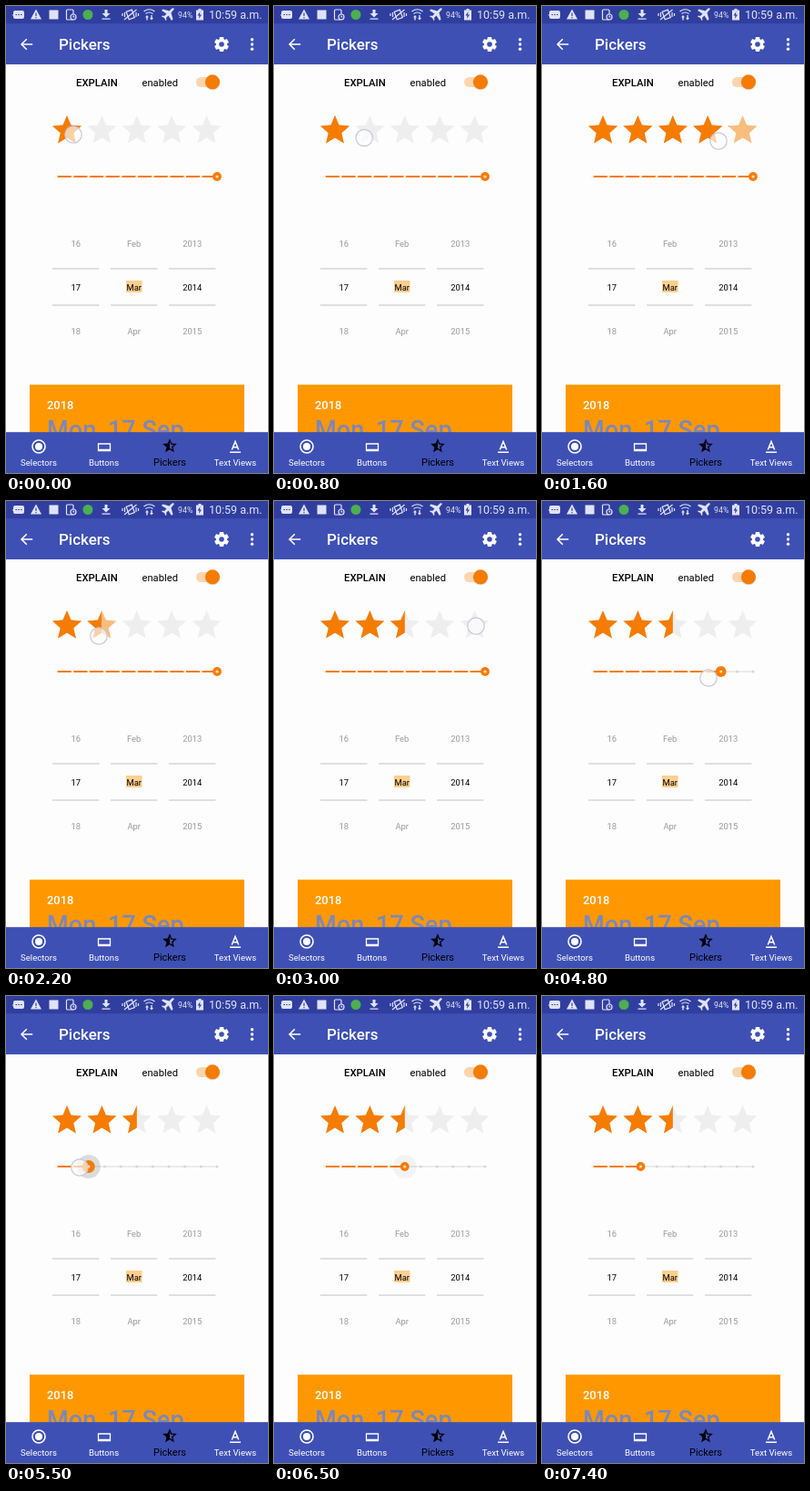
Recreate the animation shown at these times as an HTML page. Size 288 by 512 pixels, loop 8000 ms.

```html
<!DOCTYPE html>
<html lang="en">
<head>
<meta charset="utf-8">
<title>Pickers</title>
<style>
  html, body { margin: 0; height: 100%; overflow: hidden; background: #fdfdfd; }
  svg { display: block; width: 100vw; height: 100vh; }
  text { font-family: Roboto, sans-serif; }
  .mid { text-anchor: middle; }
  .line { fill: none; stroke: #fff; }
</style>
</head>
<body>
<svg viewBox="0 0 288 512">
  <defs>
    <path id="star" d="M12 17.27 18.18 21l-1.64-7.03L22 9.24l-7.19-.61L12 2 9.19 8.63 2 9.24l5.46 4.73L5.82 21z"/>
    <clipPath id="fillClip"><rect id="fillBox" x="47.8" y="110" width="0" height="50"/></clipPath>
  </defs>
  <rect width="288" height="512" fill="#fdfdfd"/>

  <!-- status bar and app bar -->
  <rect width="288" height="64" fill="#3e50b4"/>
  <rect width="288" height="19.2" fill="#303f9f"/>
  <g fill="#e0e3f5">
    <path d="M10 5h8a2 2 0 0 1 2 2v5a2 2 0 0 1-2 2h-8a2 2 0 0 1-2-2v-1l-1-1 1-1v-2a2 2 0 0 1 2-2z"/>
    <path d="M33 3.5l6 11h-12z"/>
    <rect x="47.5" y="4.5" width="10" height="10"/>
    <circle cx="90" cy="9.5" r="5.5" fill="#4caf50"/>
    <path d="M108.500 4h3v4h3l-4.500 4.500-4.500-4.500h3zM105.500 13.500h9v1.300h-9z"/>
    <path d="M185 3q-1.500-1.500-3 0l-2.500 2.500-7-2-1.500 1.500 5.500 3.500-2.500 2.500-2-.5-1 1 3 1.500 1.500 3 1-1-.5-2 2.500-2.500 3.500 5.500 1.500-1.500-2-7z"/>
    <path d="M211.500 3h3v1.500h2.500v11h-8v-11h2.500z"/>
    <path d="M213.500 6l-3 4.500h2l-.5 3.500 3-4.500h-2z" fill="#303f9f"/>
    <path d="M153 12.500l2-2.500 2 2.500h-1.300v3h-1.400v-3zM158 13l2 2.500 2-2.500h-1.300v-3h-1.400v3z"/>
    <text x="189" y="12.500" font-size="8.8">94%</text>
    <text x="223" y="14" font-size="12.5">10:59 a.m.</text>
  </g>
  <g class="line" stroke-width="1.2" style="stroke:#e0e3f5">
    <rect x="66.500" y="4" width="7.500" height="11" rx="1"/>
    <circle cx="74" cy="12" r="3" fill="#303f9f"/>
    <path d="M74 10.500v1.500h1.500"/>
    <rect x="133.500" y="5" width="6.500" height="9" transform="rotate(-20 136.700 9.500)"/>
    <path d="M130.500 7v5M128 8v3M143 7v5M145.500 8v3M130 15 143.500 4"/>
    <path d="M151.500 6q6-4.500 12 0M153.500 8.500q4-3 8 0"/>
    <path d="M33 7.500v3.500M33 12v1.300M10.500 9.500h1.500M13.300 9.500h1.500M16.100 9.500h1.500" style="stroke:#303f9f"/>
  </g>
  <path class="line" stroke-width="1.5" d="M29.200 42H17M22.800 36.200 17 42l5.800 5.800"/>
  <text x="58" y="48" font-size="16.9" font-weight="500" fill="#fff">Pickers</text>
  <g id="gear" transform="translate(237 42)" fill="#fff"><circle r="6.2"/></g>
  <g fill="#fff">
    <circle cx="270.500" cy="36.800" r="1.7"/><circle cx="270.500" cy="42" r="1.7"/><circle cx="270.500" cy="47.200" r="1.7"/>
  </g>

  <!-- switch row -->
  <text x="77" y="88" font-size="11.3" font-weight="500">EXPLAIN</text>
  <text x="149.500" y="88" font-size="11.2">enabled</text>
  <rect x="209" y="78" width="26" height="11" rx="5.5" fill="#fbd5ae"/>
  <circle cx="227" cy="84" r="8.4" fill="#000" opacity=".12"/>
  <circle cx="227" cy="83.300" r="8" fill="#f57c00"/>

  <!-- rating -->
  <g id="empty"></g>
  <g id="full" fill="#f57c00" clip-path="url(#fillClip)"></g>

  <!-- slider -->
  <path d="M55.500 187H232" stroke="#e6e6e6" stroke-width="1.5"/>
  <path id="bar" stroke="#f57c00" stroke-width="2"/>
  <g id="ticks"></g>
  <circle id="halo" cy="187" r="13" fill="#000"/>
  <circle id="knob" cy="187" fill="#f57c00"/>
  <circle id="dot" cy="187" r="1.6" fill="#fde3c8"/>

  <g id="wheels" class="mid" font-size="9.4"></g>

  <!-- date card -->
  <rect x="26" y="415.2" width="236" height="60" fill="#ff9800"/>
  <text x="45" y="441.500" font-size="12.9" font-weight="500" fill="#fff">2018</text>
  <text x="45" y="474" font-size="27.1" font-weight="500" fill="#7d87b8">Mon, 17 Sep</text>

  <!-- bottom bar -->
  <rect y="467.2" width="288" height="45" fill="#3e50b4"/>
  <circle class="line" cx="36" cy="483" r="7" stroke-width="1.6"/>
  <circle cx="36" cy="483" r="4" fill="#fff"/>
  <path class="line" stroke-width="1.3" d="M101.500 480h13v7.500h-13zM101.500 486.500h13"/>
  <path transform="translate(170.600 472.800) scale(.78)" d="M22 9.240l-7.190-.62L12 2 9.190 8.630 2 9.240l5.460 4.730L5.820 21 12 17.270 18.180 21l-1.630-7.030zM12 15.400V6.100l1.710 4.040 4.380.38-3.320 2.880 1 4.280z"/>
  <path class="line" stroke-width="1.5" d="M248.300 486.500 252 477.500l3.700 9M249.500 483.700h5M246 489.300h12"/>
  <g class="mid" fill="#fff" font-size="9.6">
    <text x="36" y="503.700">Selectors</text>
    <text x="107.500" y="503.700">Buttons</text>
    <text x="180" y="503.700" font-size="11" fill="#000">Pickers</text>
    <text x="252" y="503.700">Text Views</text>
  </g>

  <circle id="touch" r="9.2" fill="#fff" fill-opacity=".65" stroke="#c6c8e2" stroke-width="1.2"/>
</svg>
<script>
const $ = id => document.getElementById(id);
const set = (el, attrs) => {
  for (const k in attrs) el.setAttribute(k, attrs[k]);
  return el;
};
const add = (parent, tag, attrs, text = '') => {
  const el = set(document.createElementNS('http://www.w3.org/2000/svg', tag), attrs);
  el.textContent = text;
  return parent.appendChild(el);
};

const LOOP = 8000, STEP = 100, LAG = 100;
const DRAG_START = 300; // the rating holds until the finger has moved far enough
const STAR_X = 47.8, STAR_Y = 116.8, STAR_W = 38.4, SLIDE_X = 55.5, SLIDE_W = 176.5;

for (const angle of [0, 60, 120])
  add($('gear'), 'rect', { x: -2.3, y: -8, width: 4.6, height: 16, rx: 0.7, transform: `rotate(${angle})` });
add($('gear'), 'circle', { r: 2.8, fill: '#3e50b4' });

const addStar = (parent, i) =>
  add(parent, 'use', { href: '#star', transform: `translate(${STAR_X + STAR_W * i} ${STAR_Y}) scale(1.6)` });
const stars = [0, 1, 2, 3, 4].map(i => {
  addStar($('full'), i);
  return addStar($('empty'), i);
});
const ticks = Array.from({ length: 11 }, (_, i) =>
  add($('ticks'), 'circle', { cx: SLIDE_X + SLIDE_W * i / 10, cy: 187, r: 1.5 }));

[['16', '17', '18'], ['Feb', 'Mar', 'Apr'], ['2013', '2014', '2015']].forEach((words, col) => {
  const x = 76.7 + 64 * col;
  if (col === 1) add($('wheels'), 'rect', { x: 132, y: 301, width: 17.5, height: 13, fill: '#ffcf8f' });
  for (const y of [287, 327])
    add($('wheels'), 'rect', { x: x - 25.7, y, width: 51.4, height: 2, fill: '#dfdfdf' });
  words.forEach((word, row) =>
    add($('wheels'), 'text', { x, y: 264 + 48 * row, fill: row === 1 ? '#000' : '#999' }, word));
});

// Each gesture is a list of [time, x]; the finger lifts after the last point.
const rateDrag = [[0, 74], [350, 28], [900, 115], [1000, 132], [1350, 224], [1600, 194], [1800, 165], [2150, 95], [2500, 143.8]];
const slideDrag = [[4400, 232], [4800, 183], [5500, 81], [5700, 55], [5850, 55], [6300, 144], [6400, 144]];
const gestures = [
  { y: 141, path: rateDrag },
  { y: 137, path: [[3000, 222], [3200, 222]] },
  { y: 137, path: [[3600, 140], [3800, 140]] },
  { y: 193, path: slideDrag },
  { y: 188, path: [[7100, 109], [7300, 109]] },
];

const clamp = (v, lo, hi) => Math.min(hi, Math.max(lo, v));

function along(path, t) {
  if (t <= path[0][0]) return path[0][1];
  for (let i = 1; i < path.length; i++) {
    const [t0, x0] = path[i - 1], [t1, x1] = path[i];
    if (t <= t1) return x0 + (x1 - x0) * (t - t0) / (t1 - t0);
  }
  return path[path.length - 1][1];
}

function ratingAt(t) {
  if (t < DRAG_START) return 1;
  if (t < 2600) return clamp((along(rateDrag, t - LAG) - STAR_X) / STAR_W, 0, 5);
  return t >= 3100 && t < 3700 ? 5 : 2.5;
}

function levelAt(t) {
  if (t >= 7200) return 3;
  return clamp(Math.round((along(slideDrag, t - LAG) - SLIDE_X) / SLIDE_W * 10), 0, 10);
}

function drawRating(t) {
  const rating = ratingAt(t);
  const dragging = t >= DRAG_START && t < 2600;
  set($('fillBox'), { width: rating * STAR_W });
  stars.forEach((star, i) =>
    set(star, { fill: dragging && i < Math.ceil(rating) ? '#f9bd80' : '#eee' }));
}

function drawSlider(t) {
  const level = levelAt(t), x = SLIDE_X + SLIDE_W * level / 10;
  const held = t >= 4400 && t <= 6400;
  const grow = held ? clamp((t - 4400) / 400, 0, 2) : 0;
  const halo = held ? 0.13 * clamp((t - 4800) / 400, 0, 1)
    : t > 6400 ? 0.04 * clamp((6900 - t) / 400, 0, 1) : 0;
  set($('bar'), { d: `M${SLIDE_X} 187H${x}` });
  ticks.forEach((tick, i) => set(tick, { fill: i <= level ? '#fdeedd' : '#d6d6d6' }));
  set($('halo'), { cx: x, opacity: halo });
  set($('knob'), { cx: x, r: 4.9 + grow });
  set($('dot'), { cx: x });
}

function drawTouch(t) {
  const g = gestures.find(({ path }) => t >= path[0][0] && t <= path[path.length - 1][0]);
  $('touch').style.display = g ? '' : 'none';
  if (!g) return;
  const y = g.path === rateDrag ? 141 + 7 * clamp(t / 1600, 0, 1)
    : g.path === slideDrag ? 194 - 6 * clamp((t - 4800) / 700, 0, 1) : g.y;
  set($('touch'), { cx: along(g.path, t), cy: y });
}

const start = performance.now();
function frame() {
  const elapsed = (performance.now() - start) % LOOP;
  const t = Math.floor(elapsed / STEP) * STEP; // the screen refreshes ten times a second
  drawRating(t);
  drawSlider(t);
  drawTouch(t);
  requestAnimationFrame(frame);
}
frame();
</script>
</body>
</html>
```
